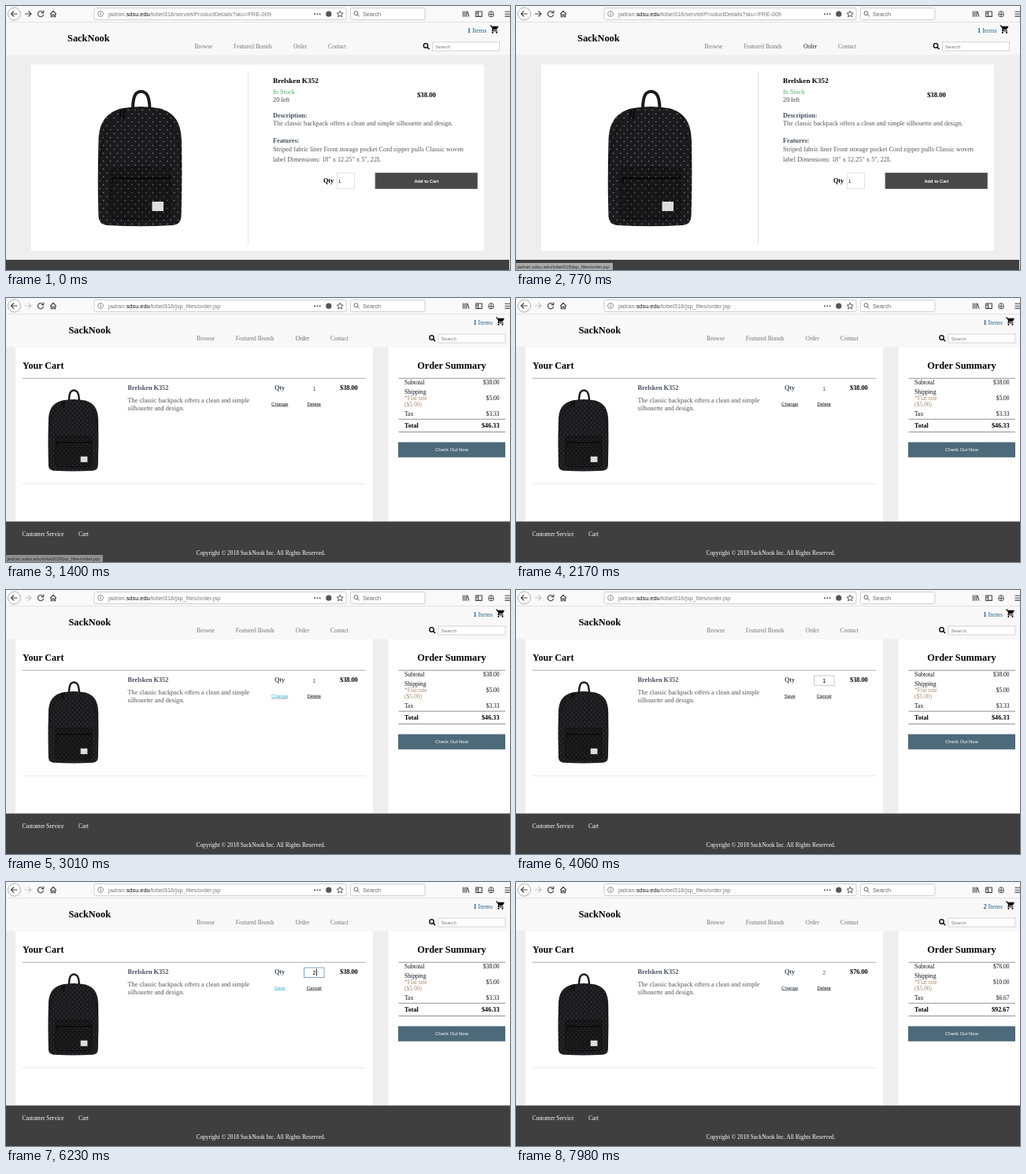
Write an HTML page that moves like this. It is 640x336 px and loops after 8000 ms.

```html
<!DOCTYPE html>
<html lang="en">
<head>
<meta charset="utf-8">
<title>Shopping cart demo</title>
<style>
  html, body { margin: 0; width: 100%; height: 100%; overflow: hidden; background: #fff; }
  svg { display: block; width: 640px; height: 336px; }
  text { font-family: "Liberation Serif", "Times New Roman", serif; font-size: 8.27px; fill: #555; white-space: pre; }
  .sans { font-family: "Liberation Sans", Arial, sans-serif; }
  .bold { font-weight: bold; }
  .line { fill: none; stroke: #444; stroke-width: 1.1; }
</style>
</head>
<body>
<svg id="stage" viewBox="0 0 640 336" xmlns="http://www.w3.org/2000/svg"></svg>
<script>
const LOOP = 8000;
const SHOP = "SackNook";
const BAG = "Brelsken K352";
const HOST = "jadran.";
const SITE = "sdsu.edu";
const FOLDER = "/tobel318/";
const ORDER_PATH = FOLDER + "jsp_files/order.jsp";
const PRODUCT_PATH = FOLDER + "servlet/ProductDetails?sku=FRE-009";

const rect = (x, y, w, h, fill, extra = "") =>
  `<rect x="${x}" y="${y}" width="${w}" height="${h}" fill="${fill}" ${extra}/>`;
const frame = (x, y, w, h, stroke, extra = "") =>
  rect(x + .5, y + .5, w - 1, h - 1, "#fff", `stroke="${stroke}" ${extra}`);
const path = (d, extra = "") => `<path d="${d}" class="line" ${extra}/>`;
const rule = (x1, x2, y, color) => rect(x1, y, x2 - x1, .8, color);

function text(x, y, content, { size = 8.27, fill = "#555", cls = "", anchor = "start", id = "", extra = "" } = {}) {
  return `<text x="${x}" y="${y}" class="${cls}" text-anchor="${anchor}" ${id && `id="${id}"`} ` +
    `style="font-size:${size}px;fill:${fill}" ${extra}>${content}</text>`;
}
const bold = (x, y, content, options = {}) => text(x, y, content, { cls: "bold", fill: "#000", ...options });
const sans = (x, y, content, options = {}) => text(x, y, content, { cls: "sans", size: 6.1, ...options });

function magnifier(x, y, r, color, width) {
  return `<g fill="none" stroke="${color}" stroke-width="${width}"><circle cx="${x}" cy="${y}" r="${r}"/>` +
    `<path d="M${x + r * .7} ${y + r * .7}l${r} ${r}"/></g>`;
}

function browserBar() {
  return rect(0, 0, 640, 21, "#f9f9fa") + rect(0, 20.3, 640, .7, "#d8d8da") +
    `<circle cx="10.5" cy="10" r="8" fill="#fff" stroke="#999" stroke-width=".8"/>` +
    path("M14.5 10H6.8M10 6.5L6.5 10l3.5 3.5") +
    path("M24 10h7.7M28.5 6.5L32 10l-3.5 3.5", 'id="forward"') +
    path("M46.6 7.6A3.6 3.6 0 1 0 47.6 10.7M47.8 5.5V8.6H44.7") +
    path("M56 10.4L60 6.4l4 4M57.3 9.8V13.7H59V11h2v2.7h1.7V9.8") +
    frame(111.5, 2, 321, 16, "#cfcfd2", 'rx="2"') +
    `<circle cx="120" cy="10" r="3.5" fill="none" stroke="#777" stroke-width=".8"/>` +
    path("M120 9.4v2.5M120 7.7v.9", 'style="stroke-width:.8"') +
    `<text x="130" y="12.9" class="sans" style="font-size:7.42px;fill:#777">${HOST}` +
    `<tspan fill="#111">${SITE}</tspan><tspan id="urlPath"></tspan></text>` +
    [392, 395.3, 398.6].map(x => `<circle cx="${x}" cy="10.3" r="1" fill="#555"/>`).join("") +
    `<circle cx="409.8" cy="10.2" r="3.6" fill="#555"/>` +
    path("M424.2 6.2l1.2 2.6 2.8.3-2.1 1.9.6 2.8-2.5-1.4-2.5 1.4.6-2.8-2.1-1.9 2.8-.3z", 'style="stroke-width:.9"') +
    frame(437, 2, 95.5, 16, "#cfcfd2", 'rx="2"') +
    magnifier(444.5, 9.2, 2.5, "#666", 1) +
    sans(453, 12.9, "Search", { size: 7.3, fill: "#666" }) +
    path("M580.5 6.5V13.7M582.7 6.5V13.7M584.9 6.5V13.7M586 7l2 6.7") +
    path("M596.7 7h7.6v6.4h-7.6zM599.6 7v6.4M597 9.2h2.4") +
    path("M613 13V9.3a3 2.6 0 0 1 6 0V13M612.5 10.7h7M616 7v6M613.5 13.5h5", 'style="stroke-width:.9"') +
    path("M633.5 7.3h6.5M633.5 10.2h6.5M633.5 13.1h6.5");
}

function cartIcon(x, y) {
  return `<path transform="translate(${x} ${y}) scale(.51)" d="M1 2v2h2l3.6 7.600-1.350 2.450C4.500 15.400 5.500 17 7 17h12v-2H7.400` +
    `l1.100-2h7.450c.75 0 1.400-.4 1.750-1L21.300 5.500C21.700 4.800 21.200 4 20.400 4H5.200l-.95-2z` +
    `M7 18a2 2 0 1 0 .01 0zM17 18a2 2 0 1 0 .01 0z"/>`;
}

// The header sits slightly further right on the order page.
function header(dx, rightShift, name) {
  const nav = [["Browse", 239.5], ["Featured Brands", 289], ["Order", 365], ["Contact", 409]];
  return rect(0, 21, 640, 41.5, "#f8f8f8") +
    bold(78 + dx / 2, 44.8, SHOP, { size: 12.4 }) +
    nav.map(([label, x]) => text(x + dx, 53.7, label, { size: 7.44, fill: "#777", id: label === "Order" ? name + "Order" : "" })).join("") +
    `<g transform="translate(${rightShift} 0)">` +
    bold(586, 33.6, "1", { id: name + "Count", fill: "#1d5c8c" }) + text(592, 33.6, "Items", { fill: "#2c6488" }) +
    cartIcon(614.3, 23.6) +
    magnifier(533, 50.4, 2.7, "#000", 1.3) +
    frame(541, 45.5, 86, 12, "#d4d4d4") + sans(545, 53.6, "Search", { fill: "#777" }) + `</g>`;
}

function backpack() {
  const body = "M117.500 172C118 148 127 136 146 130.500Q158 128 171 128T196 130.500C214 136 222.500 148 223 172" +
    "Q224 220 222.500 268Q222 278 212 279Q171 281.500 128 279Q118 278 117.500 268Q116 220 117.500 172Z";
  return `<path d="M161 131Q161 117 165 111.500Q171.500 106 178 111.500Q182.500 117 182.500 131" fill="none" stroke="#1c1c1f" stroke-width="4"/>` +
    `<path d="${body}" fill="#1b1b1d"/><path d="${body}" fill="url(#dots)"/>` +
    `<path d="M118 206Q121 165 135 143M222 206Q221 165 207 143" fill="none" stroke="#101012" stroke-width="1"/>` +
    `<path d="M133 207Q171 204 209 207V265Q208 271 202 271Q171 273 139 271Q132 270 132 264Z" fill="#000" fill-opacity=".2" stroke="#0c0c0d" stroke-width="1"/>` +
    `<path d="M136 218.500Q171 220.500 209 218.500" fill="none" stroke="#050506" stroke-width="2"/>` +
    `<path d="M136 218v7M151 130l-2 14M146 132l-1 11" stroke="#08080a" stroke-width="2"/>` +
    rect(185.5, 249, 14.5, 12, "#ddd");
}

function productPage() {
  return rect(0, 21, 640, 315, "#eee") + header(0, 0, "product") +
    rect(32, 74.5, 575, 237, "#fff") + rect(307, 83, .8, 220, "#ddd") + backpack() +
    bold(339, 98.2, BAG, { size: 9.2 }) +
    text(339, 111.8, "In Stock", { fill: "#4caf68" }) +
    text(339, 122, "20 left", { fill: "#444" }) +
    bold(522, 116.4, "$38.00", { size: 8.7 }) +
    bold(339, 141.6, "Description:", { fill: "#46505c" }) +
    text(339, 152.2, "The classic backpack offers a clean and simple silhouette and design.") +
    bold(339, 174, "Features:", { fill: "#46505c" }) +
    text(339, 184.8, "Striped fabric liner Front storage pocket Cord zipper pulls Classic woven") +
    text(339, 198.2, 'label Dimensions: 18" x 12.25" x 5", 22L') +
    bold(403, 225.2, "Qty", { size: 8.2 }) +
    frame(420, 212, 23, 21, "#e4e4e4") + sans(422, 224.8, "1", { fill: "#000" }) +
    rect(469, 212.5, 129.5, 20, "#484848", 'stroke="#666" stroke-width=".8"') +
    sans(534, 224.8, "Add to Cart", { cls: "sans bold", size: 5.7, fill: "#fff", anchor: "middle" }) +
    rect(0, 323, 639, 13, "#3f3f3f");
}

function orderPage() {
  const label = (y, content, options) => text(506, y, content, { size: 7.6, fill: "#111", ...options });
  const amount = (y, id) => text(626.5, y, "", { size: 7.5, fill: "#111", anchor: "end", id });
  const link = (x, id) => sans(x, 136.6, "", { anchor: "middle", id, extra: 'text-decoration="underline"' });
  return rect(0, 21, 640, 315, "#eee") + header(2.8, 7.5, "cart") +
    rect(12, 62.5, 454, 222, "#fff") + rect(485.5, 62.5, 154.5, 222, "#fff") +
    bold(21, 89.6, "Your Cart", { size: 12.1 }) + rule(21, 457, 101.8, "#999") +
    `<g transform="translate(-16.6 52.3) scale(.6)">${backpack()}</g>` +
    bold(154.5, 117, BAG, { fill: "#46505c", size: 8.25 }) +
    text(154.5, 133, "The classic backpack offers a clean and simple") +
    text(154.5, 143.2, "silhouette and design.") +
    bold(347.5, 117, "Qty", { fill: "#46505c", size: 8.2, anchor: "middle" }) +
    `<rect id="field" x="378.500" y="109" width="25.500" height="12.500" fill="#fff"/>` +
    rect(389, 110.3, 4.6, 9.4, "#3f8f9b", 'id="selection"') +
    sans(391.3, 118, "", { size: 7.6, anchor: "middle", id: "quantity" }) +
    rect(394, 110.5, .8, 9, "#000", 'id="caret"') +
    link(347.7, "editLink") + link(391.2, "dropLink") +
    bold(446.7, 117, "", { size: 8.25, anchor: "end", id: "price" }) +
    rule(21, 457, 236, "#e4e4e4") +
    bold(566, 89.8, "Order Summary", { size: 12.3, anchor: "middle" }) +
    rule(498.5, 634, 101.8, "#777") + rule(498.5, 634, 153.8, "#777") + rule(498.5, 634, 170, "#777") +
    label(110.4, "Subtotal") + amount(110.4, "subtotal") +
    label(122.3, "Shipping") + amount(130, "shipping") +
    label(130, "*Flat rate", { fill: "#a88d70" }) + label(138, "($5.00)", { fill: "#a88d70" }) +
    label(149.6, "Tax") + amount(149.6, "tax") +
    bold(506, 165.4, "Total", { size: 8.1 }) +
    bold(626.5, 165.4, "", { size: 8.2, anchor: "end", id: "total" }) +
    rect(498, 183.5, 136, 19.3, "#4d6a7a") +
    sans(566, 195.3, "Check Out Now", { size: 6, fill: "#fff", anchor: "middle" }) +
    rect(0, 284.5, 640, 52, "#3f3f3f") +
    text(20.5, 302.5, "Customer Service", { size: 7.44, fill: "#fff" }) +
    text(92, 302.5, "Cart", { size: 7.44, fill: "#fff" }) +
    text(323.5, 326.8, `Copyright © 2018 ${SHOP} Inc. All Rights Reserved.`, { size: 7.44, fill: "#fff", anchor: "middle" });
}

const stage = document.getElementById("stage");
stage.innerHTML =
  `<defs><pattern id="dots" width="9" height="10" patternUnits="userSpaceOnUse">` +
  `<g fill="#94948f"><circle cx="2.2" cy="2.5" r=".7"/><circle cx="6.7" cy="7.5" r=".7"/></g></pattern></defs>` +
  `<g id="productPage">${productPage()}</g><g id="orderPage">${orderPage()}</g>` +
  `<g id="status">${rect(0, 327, 123, 9, "#dedede")}${sans(1.5, 333.9, HOST + SITE + ORDER_PATH, { fill: "#222" })}</g>` +
  browserBar();

const ui = {};
stage.querySelectorAll("[id]").forEach(node => ui[node.id] = node);

const ramp = (t, start, end) => Math.min(1, Math.max(0, (t - start) / (end - start)));
const pulse = (t, a, b, c, d) => ramp(t, a, b) - ramp(t, c, d);
const mix = (from, to, k) => `rgb(${from.map((v, i) => Math.round(v + (to[i] - v) * k)).join()})`;
const show = (node, visible) => node.style.display = visible ? "" : "none";
const money = value => "$" + value.toFixed(2);

const BLACK = [0, 0, 0], INK = [20, 20, 20], GRAY = [119, 119, 119], CYAN = [62, 170, 198];

function render(t) {
  const requested = t >= 1120;
  const onOrder = t >= 1400;
  const editing = t >= 3430 && t < 6790;
  const focused = t >= 4480 && t < 6790;
  const typed = t >= 5530;
  const items = t >= 6790 ? 2 : 1;

  show(ui.productPage, !onOrder);
  show(ui.orderPage, onOrder);
  ui.urlPath.textContent = requested ? ORDER_PATH : PRODUCT_PATH;
  ui.forward.style.stroke = requested ? "#c4c4c6" : "#444";
  ui.status.style.opacity = pulse(t, 630, 840, 1050, 1200) + pulse(t, 1295, 1505, 1960, 2170);

  ui.productOrder.style.fill = mix(GRAY, BLACK, ramp(t, 600, 850));
  ui.cartOrder.style.fill = mix(GRAY, BLACK, pulse(t, 1330, 1680, 1890, 2100));
  ui.cartCount.textContent = items;

  const hover = pulse(t, 2450, 2660, 3850, 4060) + pulse(t, 5870, 6090, 7900, 8000);
  ui.editLink.textContent = editing ? "Save" : "Change";
  ui.editLink.style.fill = mix(INK, CYAN, hover);
  ui.dropLink.textContent = editing ? "Cancel" : "Delete";
  ui.dropLink.style.fill = "#111";

  show(ui.field, editing);
  ui.field.setAttribute("stroke", focused ? "#7ba3cf" : "#ccc");
  show(ui.selection, focused && !typed);
  show(ui.caret, (t >= 5530 && t < 5670) || (t >= 6230 && t < 6650));
  ui.quantity.textContent = typed ? 2 : 1;
  ui.quantity.style.fill = editing ? "#111" : "#666";

  const subtotal = 38 * items, shipping = 5 * items, tax = subtotal * .0877;
  ui.price.textContent = ui.subtotal.textContent = money(subtotal);
  ui.shipping.textContent = money(shipping);
  ui.tax.textContent = money(tax);
  ui.total.textContent = money(subtotal + shipping + tax);
}

const begin = performance.now();
function tick() {
  render((performance.now() - begin) % LOOP);
  requestAnimationFrame(tick);
}
render(0);
requestAnimationFrame(tick);
</script>
</body>
</html>
```
